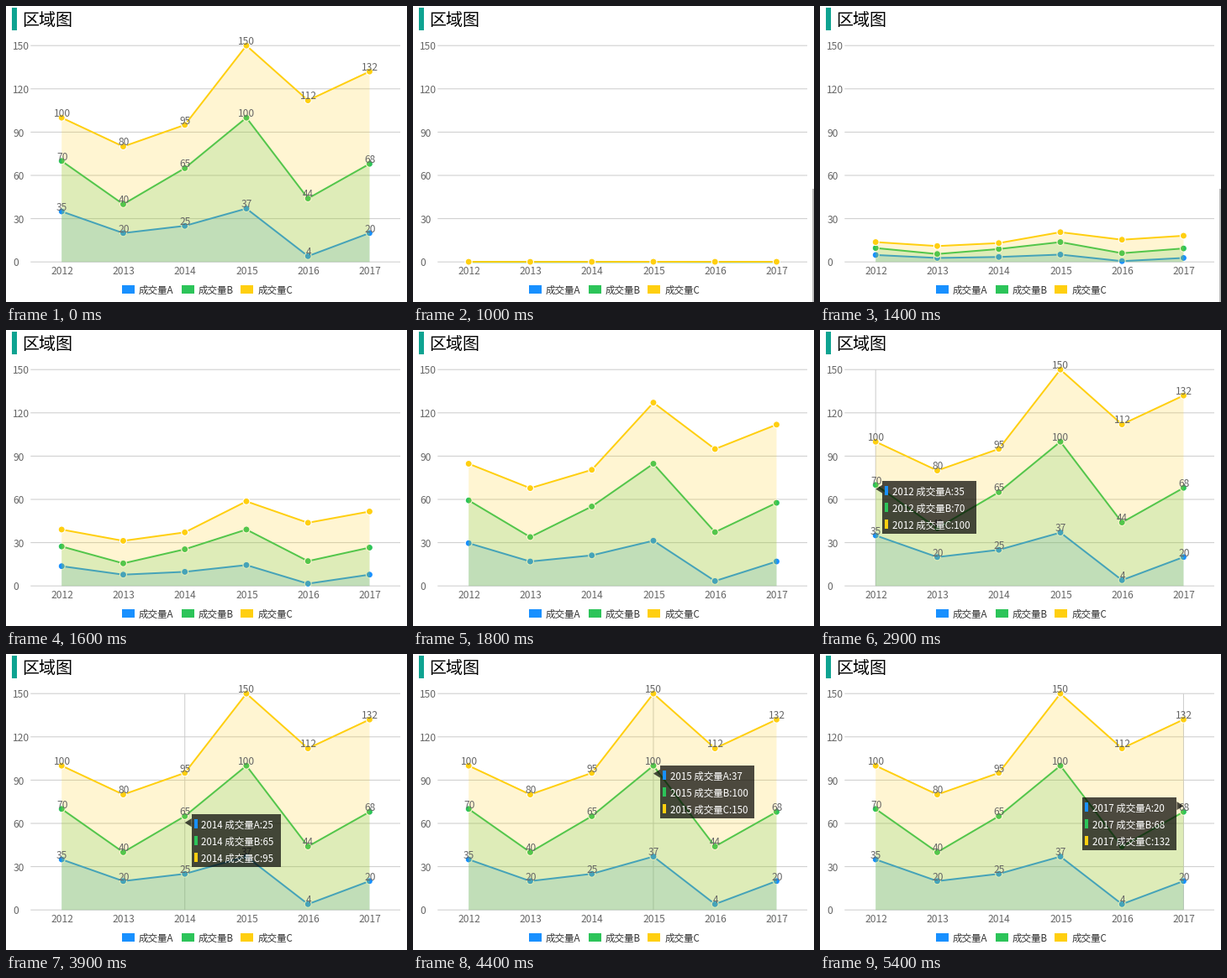
A matplotlib script for the animation above (6400 ms loop, 477x353 px).

```python
import matplotlib.pyplot as plt
from matplotlib.animation import FuncAnimation
from matplotlib.patches import Circle, Polygon, Rectangle

W, H, DPI = 477, 353, 64
PX = 72 / DPI  # points per pixel
STEP, FRAMES = 100, 64

YEARS = [str(y) for y in range(2012, 2018)]
SERIES = [
    ("成交量A", "#1890ff", [35, 20, 25, 37, 4, 20]),
    ("成交量B", "#2cc459", [70, 40, 65, 100, 44, 68]),
    ("成交量C", "#ffcf10", [100, 80, 95, 150, 112, 132]),
]
XS = [66.2 + 73.25 * i for i in range(len(YEARS))]
BASE, SCALE = 305.2, 1.72

GROW_START, GROW_TIME = 920, 930
TIP_START, TIP_STEP = 2900, 500
BAR_START, BAR_END = 1000, 1500
ARROW = 8

plt.rcParams["font.family"] = "Noto Sans CJK JP"
plt.rcParams["toolbar"] = "None"

fig = plt.figure(figsize=(W / DPI, H / DPI), dpi=DPI, facecolor="white")
ax = fig.add_axes([0, 0, 1, 1])
ax.set_xlim(0, W)
ax.set_ylim(H, 0)
ax.axis("off")


def label(x, y, s, size=12, color="#666666", ha="left", z=20):
    return ax.text(x, y, s, fontsize=size * PX, color=color, ha=ha,
                   va="baseline", zorder=z)


def rect(x, y, w, h, color, z=1, **kw):
    return ax.add_patch(Rectangle((x, y), w, h, fc=color, lw=0, zorder=z, **kw))


def rule(xs, ys, z=1):
    return ax.plot(xs, ys, color="#cccccc", lw=PX, zorder=z, snap=False,
                   solid_capstyle="butt")[0]


def y_of(v):
    return BASE - SCALE * v


def ease_in(p):
    return min(max(p, 0), 1) ** 3


# Header, grid, axes and legend
rect(7, 2, 6, 27, "#0ea391")
label(18.7, 23, "区域图", 20, "black")

for v in range(0, 151, 30):
    rule([29.3, 469], [y_of(v)] * 2)
    label(8.4, y_of(v) + 5.2, str(v))

for x, year in zip(XS, YEARS):
    label(x + 0.5, 320, year, ha="center")

for i, (name, color, _) in enumerate(SERIES):
    x = 138 + 70.7 * i
    rect(x, 333, 15, 10, color)
    label(x + 19.7, 342.5, name, 11.5, "#333333")

scrollbar = rect(475, 218, 2, 135, "#bcbcbc")
guide = rule([], [], 1.5)

# Areas, each series over the one before
areas, lines, dots, values = [], [], [], []
for i, (_, color, data) in enumerate(SERIES):
    z = 2 + 2 * i
    areas.append(ax.add_patch(Polygon([(0, 0)] * 3, fc=color, alpha=0.19,
                                      lw=0, zorder=z, snap=False)))
    lines.append(ax.plot([], [], color=color, lw=2 * PX, snap=False,
                         solid_joinstyle="round", zorder=z + 0.5)[0])
    dots.append([ax.add_patch(Circle((x, 0), 4, fc=color, ec="white",
                                     lw=1.1 * PX, zorder=z + 1))
                 for x in XS])
    values += [label(x + 0.5, y_of(v) - 1.2, str(v), ha="center")
               for x, v in zip(XS, data)]

# Tooltip
TIP_Z = 30
tip_box = rect(0, 0, 1, 63, "black", TIP_Z, alpha=0.7)
tip_arrow = ax.add_patch(Polygon([(0, 0)] * 3, fc="black", alpha=0.7, lw=0,
                                 zorder=TIP_Z))
tip_rows = [(rect(0, 0, 4, 11, color, TIP_Z + 1),
             label(0, 0, "", 11.5, "white", z=TIP_Z + 1))
            for _, color, _ in SERIES]
tip_parts = [tip_box, tip_arrow, guide] + [a for row in tip_rows for a in row]


def show_tip(k):
    for part in tip_parts:
        part.set_visible(k is not None)
    if k is None:
        return
    x = XS[k]
    column = [data[k] for _, _, data in SERIES]
    top = y_of(sum(column) / len(column)) - 8
    width = 112 if max(column) >= 100 else 106.2
    flip = k == len(XS) - 1
    edge = x - ARROW if flip else x + ARROW
    left = edge - width if flip else edge

    guide.set_data([x, x], [y_of(150), BASE])
    tip_box.set_bounds(left, top, width, 63)
    tip_arrow.set_xy([(x, top + 10), (edge, top + 5), (edge, top + 15)])
    for i, (mark, text) in enumerate(tip_rows):
        y = top + 20 * i
        mark.set_xy((left + 3, y + 6))
        text.set_position((left + 11.7, y + 17))
        text.set_text(f"{YEARS[k]} {SERIES[i][0]}:{column[i]}")


def update(n):
    t = n * STEP
    grow = ease_in((t - GROW_START) / GROW_TIME) if t >= BAR_START else 1
    for area, line, row, (_, _, data) in zip(areas, lines, dots, SERIES):
        ys = [y_of(v * grow) for v in data]
        line.set_data(XS, ys)
        area.set_xy([(XS[0], BASE), *zip(XS, ys), (XS[-1], BASE)])
        for dot, x, y in zip(row, XS, ys):
            dot.set_center((x, y))
    for text in values:
        text.set_visible(grow == 1)
    scrollbar.set_visible(BAR_START <= t < BAR_END)
    tip = min((t - TIP_START) // TIP_STEP, len(XS) - 1)
    show_tip(tip if t >= TIP_START else None)
    return []


anim = FuncAnimation(fig, update, frames=FRAMES, interval=STEP,
                     init_func=lambda: update(0), repeat=True, repeat_delay=0)
plt.show()
```
